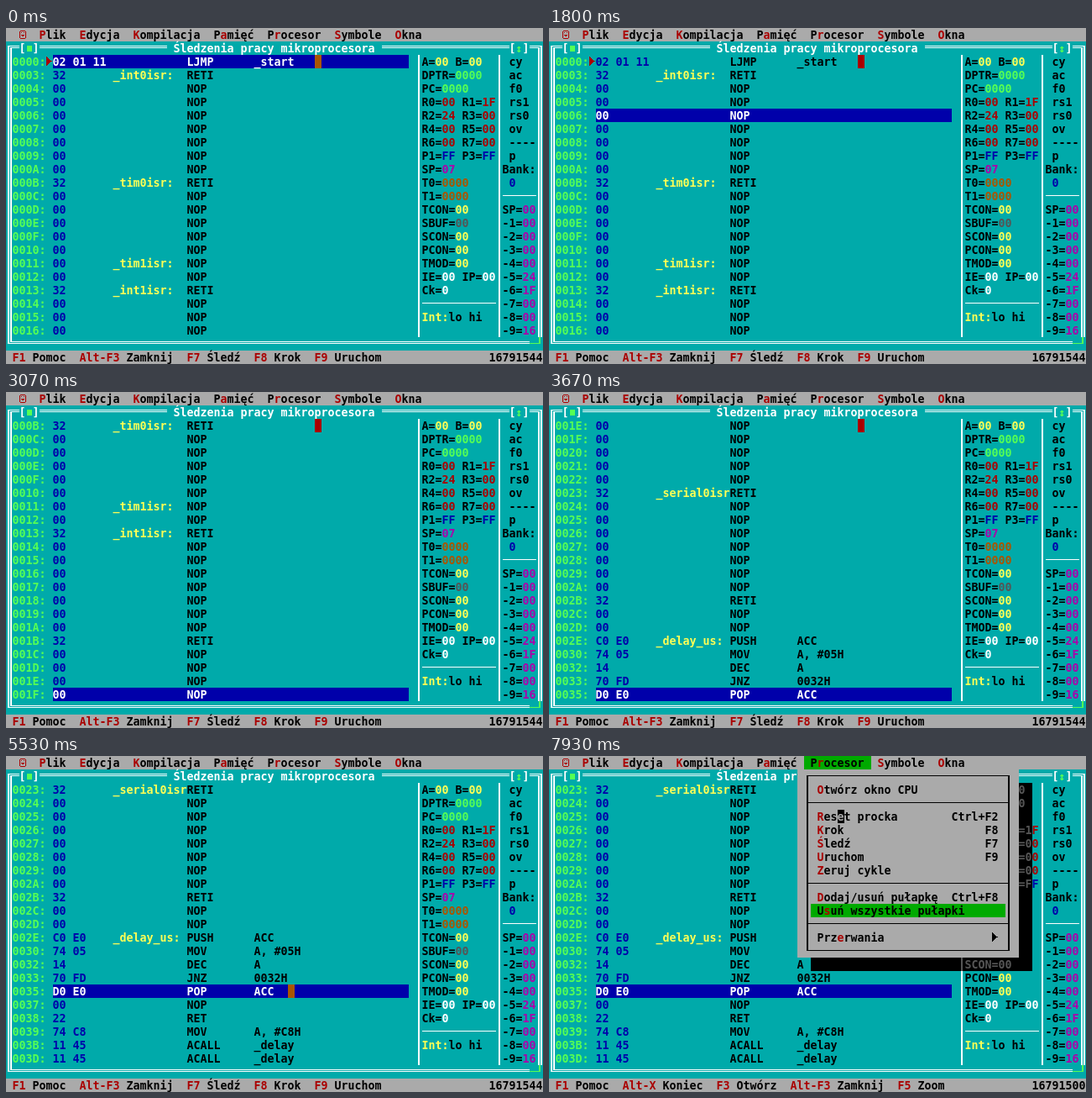
Recreate the animation shown at these times as an HTML page with a canvas. Size 640 by 400 pixels, loop 8 s.

```html
<!DOCTYPE html>
<html lang="pl">
<head>
<meta charset="utf-8">
<title>Mikroprocesor</title>
<style>
html, body { margin: 0; width: 100%; height: 100%; overflow: hidden; background: #0aa; }
canvas { display: block; }
</style>
</head>
<body>
<canvas width="640" height="400"></canvas>
<script>
const ctx = document.querySelector('canvas').getContext('2d');
const PALETTE = '#000 #00a #0a0 #0aa #a00 #a0a #a50 #aaa #555 #55f #5f5 #5ff #f55 #f5f #ff5 #fff'.split(' ');
const BLACK = 0, BLUE = 1, GREEN = 2, CYAN = 3, RED = 4, MAGENTA = 5, BROWN = 6, GRAY = 7,
  DARK = 8, LIME = 10, YELLOW = 14, WHITE = 15;
const COLS = 80, ROWS = 25;

// Box drawing as rectangles inside an 8x16 cell
const L = [0, 7, 5, 1], R = [3, 7, 5, 1], U = [3, 0, 2, 8], D = [3, 7, 2, 9];
const SHAPES = {
  '─': [L, R], '│': [U, D], '┌': [R, D], '┐': [L, D], '└': [R, U], '┘': [L, U],
  '├': [U, D, R], '┤': [U, D, L],
  '═': [[0, 5, 8, 1], [0, 7, 8, 1]],
  '║': [[2, 0, 2, 16], [5, 0, 2, 16]],
  '╔': [[2, 5, 6, 1], [2, 5, 2, 11], [5, 7, 3, 1], [5, 7, 2, 9]],
  '╗': [[0, 5, 7, 1], [5, 5, 2, 11], [0, 7, 4, 1], [2, 7, 2, 9]],
  '╚': [[2, 0, 2, 8], [2, 7, 6, 1], [5, 0, 2, 6], [5, 5, 3, 1]],
  '■': [[1, 5, 6, 7]],
  '☺': [[1, 3, 6, 1], [1, 12, 6, 1], [0, 4, 1, 8], [7, 4, 1, 8], [2, 5, 1, 1], [5, 5, 1, 1], [2, 8, 4, 1], [3, 9, 2, 1]],
  // right-pointing triangle, one rectangle per pixel row
  '►': Array.from({ length: 11 }, (_, i) => [0, i + 2, i === 5 ? 7 : 6 - Math.abs(i - 5), 1])
};

const cells = Array.from({ length: COLS * ROWS }, () => ({}));
const cell = (x, y) => cells[y * COLS + x];

function fill(x, y, w, h, bg) {
  for (let r = y; r < y + h; r++)
    for (let c = x; c < x + w; c++) Object.assign(cell(c, r), { ch: ' ', fg: BLACK, bg });
}

// "~" switches between the normal and the hot colour
function put(x, y, text, fg = BLACK, hot = RED) {
  for (const ch of text) {
    if (ch === '~') [fg, hot] = [hot, fg];
    else Object.assign(cell(x++, y), { ch, fg });
  }
}

// Program memory
const program = [];
let address = 0;
function code(bytes, op, arg = '', label = '') {
  program.push({ address: address.toString(16).toUpperCase().padStart(4, '0'), bytes, op, arg, label });
  address += bytes.split(' ').length;
}
const labels = { 0x03: '_int0isr:', 0x0B: '_tim0isr:', 0x11: '_tim1isr:', 0x13: '_int1isr:', 0x23: '_serial0isr' };
code('02 01 11', 'LJMP', '_start');
while (address < 0x2E) {
  const vector = address % 8 === 3;
  code(vector ? '32' : '00', vector ? 'RETI' : 'NOP', '', labels[address]);
}
code('C0 E0', 'PUSH', 'ACC', '_delay_us:');
code('74 05', 'MOV', 'A, #05H');
code('14', 'DEC', 'A');
code('70 FD', 'JNZ', '0032H');
code('D0 E0', 'POP', 'ACC');
code('00', 'NOP');
code('22', 'RET');
code('74 C8', 'MOV', 'A, #C8H');
code('11 45', 'ACALL', '_delay');
code('11 45', 'ACALL', '_delay');

const REGISTERS = [
  ['A=~00~ B=~00', YELLOW], ['DPTR=~0000', LIME], ['PC=~0000', LIME],
  ['R0=~00~ R1=~1F', RED], ['R2=~24~ R3=~00', RED], ['R4=~00~ R5=~00', RED], ['R6=~00~ R7=~00', RED],
  ['P1=~FF~ P3=~FF', BLUE], ['SP=~07', MAGENTA], ['T0=~0000', BROWN], ['T1=~0000', BROWN],
  ['TCON=~00', YELLOW], ['SBUF=~00', DARK], ['SCON=~00', YELLOW], ['PCON=~00', YELLOW], ['TMOD=~00', YELLOW],
  ['IE=~00~ IP=~00', WHITE], ['Ck=~0', WHITE], ['~' + '─'.repeat(11), WHITE], ['~Int:~lo hi', YELLOW]
];
const FLAGS = ['cy', 'ac', 'f0', 'rs1', 'rs0', 'ov', '----', 'p'];
const STACK = ['00', '00', '00', '00', '00', '24', '1F', '00', '00', '16'];
const MENU = [
  ['~O~twórz okno CPU'], null,
  ['~R~eset procka', 'Ctrl+F2'], ['~K~rok', 'F8'], ['~Ś~ledź', 'F7'], ['~U~ruchom', 'F9'], ['~Z~eruj cykle'], null,
  ['~D~odaj/usuń pułapkę', 'Ctrl+F8'], ['U~s~uń wszystkie pułapki'], null,
  ['Prz~e~rwania', '►']
];

// Pointer path: tick, column, row
const PATH = [
  [0, 46, 2], [65, 46, 2], [67, 48, 5], [73, 41, 16], [74, 40, 16], [76, 40, 16], [77, 41, 16],
  [78, 41, 17], [79, 41, 17], [80, 42, 17], [93, 42, 17], [98, 42, 7], [99, 42, 7], [101, 43, 3],
  [102, 43, 3], [104, 43, 1], [107, 42, 1], [108, 42, 0], [117, 42, 0], [119, 43, 4]
];
function pointer(tick) {
  const i = Math.max(1, PATH.findIndex(p => p[0] >= tick));
  const a = PATH[i - 1], b = PATH[i], k = (tick - a[0]) / (b[0] - a[0]);
  return [1, 2].map(j => Math.round(a[j] + (b[j] - a[j]) * k));
}

// Number of "down" key presses so far: taps, a held key, taps again
function presses(tick) {
  let n = [12, 23, 25, 27].filter(t => tick >= t).length;
  if (tick >= 34) n += Math.min(44, Math.floor(1 + 2.067 * (tick - 34)));
  if (tick >= 61) n += Math.min(5, 1 + (tick - 61 >> 1));
  return n;
}

function drawWindow() {
  fill(0, 1, COLS, 23, CYAN);
  put(0, 1, '╔═[~■~]' + '═'.repeat(70) + '[~↕~]═╗', WHITE, LIME);
  put(24, 1, ' Śledzenia pracy mikroprocesora ', WHITE);
  for (let y = 2; y < 23; y++) {
    for (const x of [0, 79]) put(x, y, '║', WHITE);
    for (const x of [61, 73]) put(x, y, '│', WHITE);
  }
  put(0, 23, '╚' + '═'.repeat(77) + '~─┘', WHITE, LIME);
}

function drawListing(tick) {
  const n = presses(tick), top = Math.max(0, n - 20);
  const selected = tick >= 83 ? 15 : n - top;
  for (let i = 0; i < 21; i++) {
    const line = program[top + i], y = i + 2, on = i === selected;
    if (on) fill(7, y, 53, 1, BLUE);
    put(1, y, line.address + ':', LIME);
    if (top + i === 0) put(6, y, '►', RED);
    put(7, y, line.bytes, on ? WHITE : BLUE);
    put(16, y, line.label, YELLOW);
    put(27, y, line.op, on ? WHITE : BLACK);
    put(37, y, line.arg, on ? WHITE : BLACK);
  }
}

function drawRegisters() {
  REGISTERS.forEach(([text, colour], i) => put(62, i + 2, text, BLACK, colour));
  FLAGS.forEach((text, i) => put(75, i + 2, text));
  put(74, 10, 'Bank:');
  put(75, 11, '0', BLUE);
  put(74, 12, '─────', WHITE);
  STACK.forEach((value, i) => put(74, 13 + i, `${i ? '-' + i : 'SP'}=~${value}`, BLACK, MAGENTA));
}

function drawBars(open, idle) {
  fill(0, 0, COLS, 1, GRAY);
  fill(0, 24, COLS, 1, GRAY);
  if (open) fill(38, 0, 10, 1, GREEN);
  put(2, 0, '~☺~  ~P~lik  ~E~dycja  ~K~ompilacja  P~a~mięć  P~r~ocesor  ~S~ymbole  ~O~kna');
  put(1, 24, idle
    ? '~F1~ Pomoc  ~Alt-X~ Koniec  ~F3~ Otwórz  ~Alt-F3~ Zamknij  ~F5~ Zoom'
    : '~F1~ Pomoc  ~Alt-F3~ Zamknij  ~F7~ Śledź  ~F8~ Krok  ~F9~ Uruchom');
  put(72, 24, idle ? '16791500' : '16791544');
}

function drawMenu() {
  for (let y = 2; y < 16; y++)
    for (let x = 39; x < 72; x++) Object.assign(cell(x, y), { fg: DARK, bg: BLACK });
  fill(37, 1, 33, 14, GRAY);
  const rule = '─'.repeat(29);
  put(38, 1, '┌' + rule + '┐');
  put(38, 14, '└' + rule + '┘');
  MENU.forEach((item, i) => {
    const y = i + 2;
    if (!item) return put(38, y, '├' + rule + '┤');
    const [text, key = ''] = item;
    put(38, y, '│');
    put(68, y, '│');
    if (i === 9) fill(39, y, 29, 1, GREEN);
    put(40, y, text);
    put(67 - key.length, y, key);
  });
}

function paint() {
  ctx.font = 'bold 13.3px "DejaVu Sans Mono", "Liberation Mono", monospace';
  cells.forEach(({ bg }, i) => {
    ctx.fillStyle = PALETTE[bg];
    ctx.fillRect(i % COLS * 8, Math.floor(i / COLS) * 16, 8, 16);
  });
  cells.forEach(({ ch, fg }, i) => {
    if (ch === ' ') return;
    const x = i % COLS * 8, y = Math.floor(i / COLS) * 16;
    ctx.fillStyle = PALETTE[fg];
    if (SHAPES[ch]) SHAPES[ch].forEach(([a, b, w, h]) => ctx.fillRect(x + a, y + b, w, h));
    else ctx.fillText(ch, x - 0.5, y + 13);
  });
}

function draw(tick) {
  drawWindow();
  drawListing(tick);
  drawRegisters();
  drawBars(tick >= 112, tick >= 113);
  if (tick >= 112) drawMenu();
  const under = cell(...pointer(tick));
  under.fg ^= 7;
  under.bg ^= 7;
  paint();
}

let last = -1;
function loop() {
  // 15 ticks per second on a 10 ms clock
  const time = Math.floor(performance.now() % 8000 / 10);
  const tick = Math.min(119, Math.floor((time + 0.5) * 0.15));
  if (tick !== last) draw(last = tick);
  requestAnimationFrame(loop);
}
loop();
</script>
</body>
</html>
```
